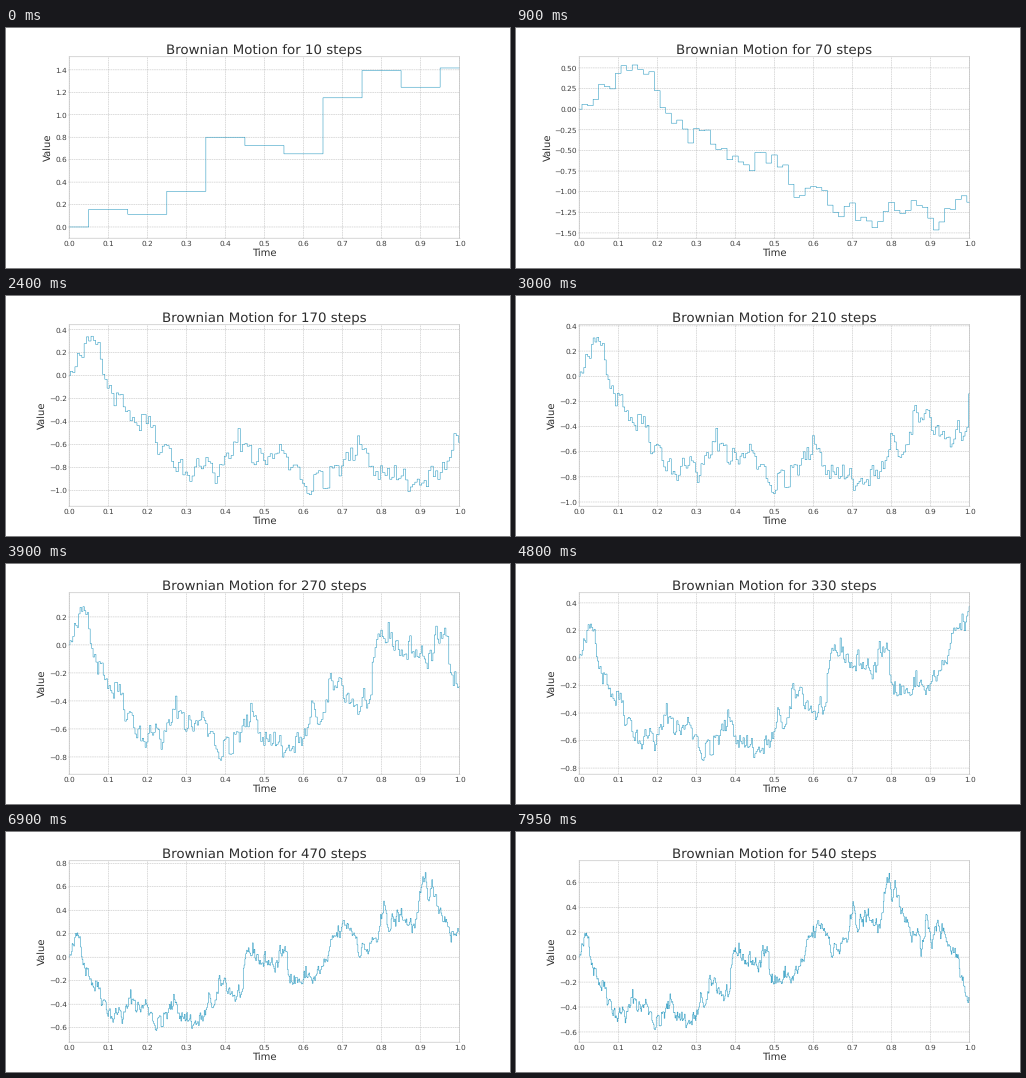
A matplotlib script for the animation above (8000 ms loop, 504x240 px).

```python
import matplotlib.pyplot as plt
import numpy as np
from matplotlib.animation import FuncAnimation

TEXT = "#2e2e2e"
plt.rcParams.update({
    "font.family": "DejaVu Sans",
    "text.hinting": "none",
    "path.snap": False,
    "axes.edgecolor": "#bcbcbc",
    "axes.linewidth": 1.8,
    "axes.axisbelow": True,
    "axes.titlecolor": TEXT,
    "axes.labelcolor": TEXT,
    "grid.color": "#b2b2b2",
    "grid.linestyle": "--",
    "grid.linewidth": 1.3,
    "xtick.labelsize": 22,
    "ytick.labelsize": 22,
})

WIDTH, HEIGHT, DPI = 504, 240, 24
LOOP_MS = 8000
TICK_MS = 50
TICKS_PER_WALK = 3
STEPS_ADDED = 10
MARGIN = 0.1
FRAMES = LOOP_MS // TICK_MS

rng = np.random.RandomState(42)
MAX_STEPS = STEPS_ADDED * ((FRAMES - 1) // TICKS_PER_WALK + 1)
WALK = np.concatenate([[0], np.cumsum(rng.randn(MAX_STEPS))])

fig, ax = plt.subplots(figsize=(WIDTH / DPI, HEIGHT / DPI), dpi=DPI,
                       facecolor="white")
fig.subplots_adjust(left=63.2 / WIDTH, right=453.65 / WIDTH,
                    bottom=1 - 210.2 / HEIGHT, top=1 - 28.75 / HEIGHT)
ax.set_xlim(0, 1)
ax.set_xticks(np.linspace(0, 1, 11))
ax.set_xlabel("Time", fontsize=30)
ax.set_ylabel("Value", fontsize=30, labelpad=5.5)
ax.tick_params(color="#999999", labelcolor="#404040")
ax.grid(True)
line, = ax.plot([], [], color="#1b93bd", lw=1.5, drawstyle="steps-mid")


def update(frame):
    steps = STEPS_ADDED * (frame // TICKS_PER_WALK + 1)
    values = WALK[:steps + 1] / np.sqrt(steps)
    line.set_data(np.linspace(0, 1, steps + 1), values)
    ax.set_ylim(values.min() - MARGIN, values.max() + MARGIN)
    ax.set_title(f"Brownian Motion for {steps} steps", fontsize=40, pad=8)
    return line,


anim = FuncAnimation(fig, update, frames=FRAMES, interval=TICK_MS,
                     repeat=True, repeat_delay=0, blit=False)
plt.show()
```
